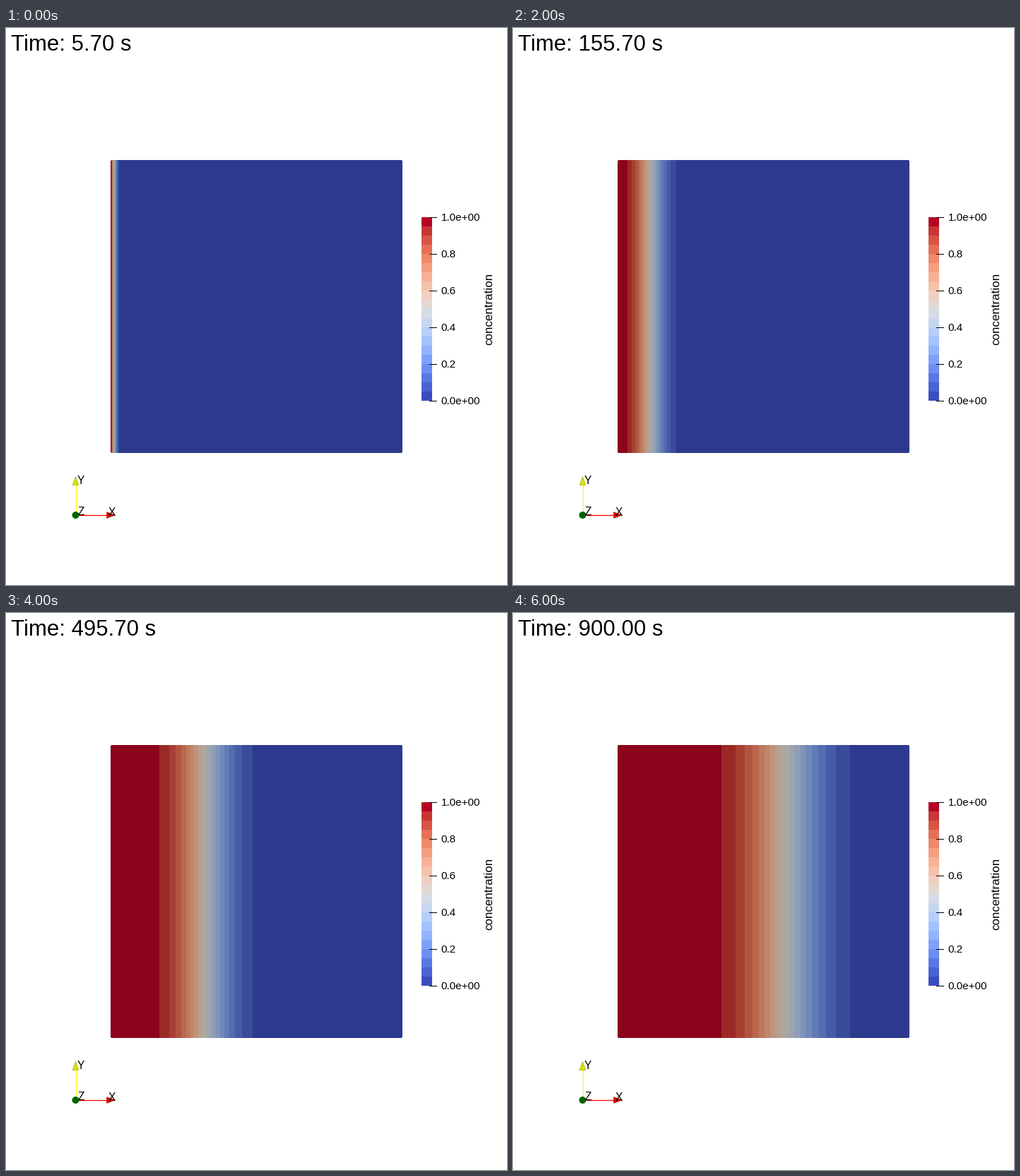
These frames come from a looping animation (709 by 789 pixels, 7 s). A matplotlib script:

```python
import math

import numpy as np
import matplotlib.pyplot as plt
from matplotlib.animation import FuncAnimation
from matplotlib.patches import Circle, FancyBboxPatch, Polygon, Rectangle

W, H, DPI = 709, 789, 100
PX = 72 / DPI  # points per pixel

TIMES = [5.7, 35.7, 155.7, 315.7, 495.7, 720.7, 900.0]
VELOCITY = 0.2555  # px per second
DIFFUSION = 1.77   # px^2 per second
HEAD_START = 2.5   # seconds gained in the first coarse time steps
BANDS = 20
LEFT, TOP, WIDTH, HEIGHT = 148, 187, 413, 415

COLORS = plt.get_cmap("coolwarm")(np.linspace(0, 1, BANDS))[:, :3]
LIT_COLORS = COLORS * [0.78, 0.765, 0.735]


def concentration(t):
    """Advection and diffusion from a fixed inlet on the left side."""
    t += HEAD_START
    x = np.arange(WIDTH) + 0.5
    spread = 2 * math.sqrt(DIFFUSION * t)
    erfc = np.vectorize(math.erfc)
    front = erfc((x - VELOCITY * t) / spread)
    inlet = np.exp(VELOCITY * x / DIFFUSION) * erfc((x + VELOCITY * t) / spread)
    return (front + inlet) / 2


def field_row(t):
    band = np.clip((concentration(t) * BANDS).astype(int), 0, BANDS - 1)
    return LIT_COLORS[band][np.newaxis]


def title_text(t):
    return f"Time: {t:.2f} s"


def draw_text(text, x, y, size, **kwargs):
    """Text with its baseline starting at (x, y), size in pixels."""
    return ax.text(x, y, text, fontsize=size * PX, family="Liberation Sans",
                   ha="left", va="baseline", rotation_mode="anchor",
                   zorder=5, **kwargs)


def draw_field():
    image = ax.imshow(field_row(TIMES[0]), aspect="auto",
                      extent=(LEFT, LEFT + WIDTH, TOP + HEIGHT, TOP),
                      interpolation="nearest")
    image.set_clip_path(FancyBboxPatch(
        (LEFT, TOP), WIDTH, HEIGHT, boxstyle="round,pad=0,rounding_size=2",
        transform=ax.transData))
    return image


def draw_colorbar(x=588, bottom=528, height=260):
    step = height / BANDS
    for i, color in enumerate(COLORS):
        ax.add_patch(Rectangle((x, bottom - step * (i + 1)), 15, step,
                               fc=color, lw=0, antialiased=False))
    for value in np.linspace(0, 1, 6):
        y = bottom - height * value
        ax.add_patch(Rectangle((x + 11, y - 0.5), 11, 1, fc="black", lw=0))
        label = f"{value:.1e}" if value in (0, 1) else f"{value:.1f}"
        draw_text(label, x + 27.5, y + 5, 15.2)
    draw_text("concentration", 688.5, 448.5, 17, rotation=90)


def draw_arrow(start, tip, color, edge):
    """Thin shaft with a cone, 12 px long, at its tip."""
    start, tip = np.array(start), np.array(tip)
    along = (tip - start) / np.linalg.norm(tip - start)
    across = along[::-1] * 4.4
    base = tip - 12 * along
    ax.plot(*zip(start, base), color=color, lw=1.3 * PX)
    ax.add_patch(Polygon([tip, base + across, base - across],
                         fc=np.array(color) * 0.88, ec=edge, lw=0.5 * PX))


def draw_triad():
    x, y = 98.5, 690
    draw_arrow((x, y), (x, 635.5), (1, 1, 0), "#8c8c00")
    draw_arrow((x, y), (154.5, y), (1, 0, 0), "#8c0000")
    ax.add_patch(Circle((x, y), 5, fc="#006400", lw=0, zorder=4))
    draw_text("Y", 100.5, 646, 15.5)
    draw_text("Z", 101, 690, 15.5)
    draw_text("X", 145, 691, 15.5)


def update(i):
    field.set_data(field_row(TIMES[i]))
    title.set_text(title_text(TIMES[i]))
    return field, title


fig = plt.figure(figsize=(W / DPI, H / DPI), dpi=DPI, facecolor="white")
ax = fig.add_axes([0, 0, 1, 1])
field = draw_field()
draw_colorbar()
draw_triad()
title = draw_text(title_text(TIMES[0]), 7, 32, 31.2)
ax.set(xlim=(0, W), ylim=(H, 0))
ax.axis("off")

anim = FuncAnimation(fig, update, frames=len(TIMES), interval=1000,
                     repeat=True, repeat_delay=0)
plt.show()
```
